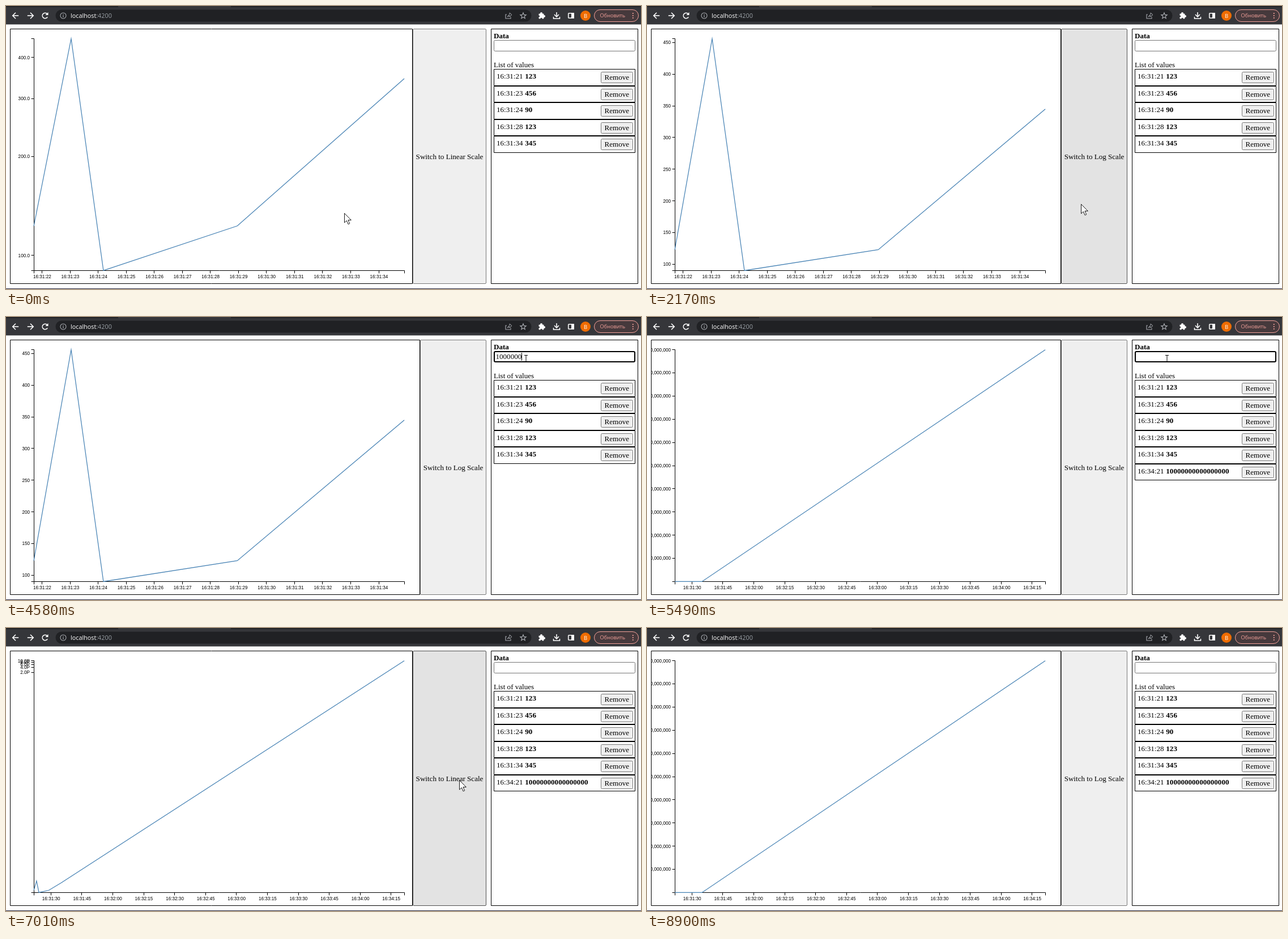
Recreate the animation shown at these times as an HTML page with a canvas. Size 1121 by 499 pixels, loop 9150 ms.

```html
<!DOCTYPE html>
<html lang="en">
<head>
<meta charset="utf-8">
<title>Chart demo</title>
<style>
html, body { margin: 0; width: 100%; height: 100%; overflow: hidden; background: #fff; }
canvas { display: block; }
</style>
</head>
<body>
<canvas id="stage" width="1121" height="499"></canvas>
<script>
const g = document.getElementById('stage').getContext('2d');
const LOOP = 9150, TICKS = 72;      // the screen refreshes 72 times per loop
const S = .8175;                    // page zoom
const BODY = `${16 * S}px "Liberation Serif", "Times New Roman", serif`;
const BOLD = `bold ${BODY}`;
const AXIS = `${10 * S}px "Liberation Sans", Arial, sans-serif`;
const ui = size => `${size}px "Open Sans", "Noto Sans", sans-serif`;

// Plot area
const L = 49.1, R = L + 800 * S, T = 57.7, B = T + 500 * S;

// Seconds after 16:31:00 and value
const DATA = [[21.71, 123], [23.04, 456], [24.19, 90], [28.96, 123], [34.91, 345], [201.4, 1e16]];

// Moments, counted in refreshes
const CLICKS = [6, 11, 17, 55, 66];
const FOCUS = 24, TYPE = 31, REPEAT = 36, TYPED = 38, ENTER = 43, BLUR = 54;

// Mouse moves: first and last refresh, destination
const HOME = [597, 365];
const MOVES = [
  [1, 5, 766, 349],
  [17, 19, 874, 228],
  [19, 23, 918, 73],
  [51, 53, 800, 268],
  [67, 70, 1095, 505]
];

const clamp = (v, lo, hi) => Math.min(hi, Math.max(lo, v));
const ease = u => u * u * (3 - 2 * u);
const snap = v => Math.floor(v) + .5;
const range = (a, b, step = 1) => Array.from({ length: Math.floor((b - a) / step) + 1 }, (_, i) => a + i * step);

function mouse(n) {
  let [x, y] = HOME;
  for (const [from, to, tx, ty] of MOVES) {
    const u = ease(clamp((n - from) / (to - from), 0, 1));
    x += (tx - x) * u;
    y += (ty - y) * u;
  }
  return [Math.round(x), Math.round(y)];
}

function typed(n) {
  if (n < TYPE || n >= ENTER) return '';
  const len = n < REPEAT ? Math.min(2, n - TYPE + 1) : Math.min(17, 7 + 5 * (n - REPEAT));
  return '1'.padEnd(len, '0');
}

// The caret blinks every four refreshes and restarts with each key
function caretOn(n) {
  const key = n < TYPE ? FOCUS : Math.min(n, TYPED);
  return Math.floor((n - key) / 4) % 2 === 0;
}

function text(s, x, y, font, color = '#000', align = 'left') {
  g.font = font;
  g.fillStyle = color;
  g.textAlign = align;
  g.fillText(s, x, y);
}

function rect(x, y, w, h, color) {
  g.fillStyle = color;
  g.fillRect(x, y, w, h);
}

function paint(fill, stroke, lw = 1) {
  if (fill) { g.fillStyle = fill; g.fill(); }
  if (stroke) { g.lineWidth = lw; g.strokeStyle = stroke; g.stroke(); }
}

function box(x, y, w, h, r, fill, stroke, lw = 1) {
  g.beginPath();
  g.roundRect(x + lw / 2, y + lw / 2, w - lw, h - lw, r);
  paint(fill, stroke, lw);
}

function poly(pts, fill, stroke, lw, close) {
  g.beginPath();
  pts.forEach(p => g.lineTo(...p));
  if (close) g.closePath();
  paint(fill, stroke, lw);
}

const line = (color, lw, ...pts) => poly(pts, null, color, lw);

function arc(x, y, r, fill, stroke, lw, from = 0, to = 2 * Math.PI) {
  g.beginPath();
  g.arc(x, y, r, from, to);
  paint(fill, stroke, lw);
}

// Arrow with its tip at the right of the centre, turned by angle
function arrow(x, y, r, angle) {
  g.save();
  g.translate(x, y);
  g.rotate(angle);
  line('#fff', 1.6, [-r, 0], [r, 0]);
  line('#fff', 1.6, [0, -r], [r, 0], [0, r]);
  g.restore();
}

function toolbar() {
  const white = '#fff', grey = '#a9acb1', pink = '#f4a19a', bar = '#35363a', dark = '#202124';
  rect(0, 0, 1121, 32.5, bar);
  rect(0, 0, 198, 2, dark);
  rect(397, 0, 724, 2, dark);
  box(87, 6, 841, 22, 11, dark);

  arrow(17, 17, 5.2, Math.PI);
  arrow(43, 17, 5.2, 0);
  arc(69, 17, 4.8, null, white, 1.6, .5, 5.5);
  poly([[74.5, 11], [74.5, 16], [69.5, 16]], white);

  arc(101, 17, 5, null, grey, 1.1);
  rect(100.4, 16.2, 1.2, 3.6, grey);
  rect(100.4, 14, 1.2, 1.2, grey);
  text('localhost', 114, 21, ui(10.8), white);
  text(':4200', 114 + g.measureText('localhost').width, 21, ui(10.8), '#9aa0a6');

  // Share and star
  line(grey, 1.1, [884, 15], [882, 15], [882, 22], [891, 22], [891, 19.5]);
  poly([[885, 19], [889, 14.5], [889, 12], [893, 15.5], [889, 19], [889, 17]], null, grey, 1, true);
  const star = range(0, 9).map(i => {
    const a = i * Math.PI / 5, r = i % 2 ? 2.4 : 5.5;
    return [913 + r * Math.sin(a), 17.3 - r * Math.cos(a)];
  });
  poly(star, null, grey, 1.1, true);

  // Puzzle, download, side panel
  box(940, 13, 10, 10, 1, white);
  arc(945, 13, 2, white);
  arc(950, 18, 2, white);
  arc(940.7, 18, 1.6, bar);
  arc(945, 22.4, 1.6, bar);
  arrow(972, 15, 4, Math.PI / 2);
  line(white, 1.5, [966.5, 19], [966.5, 22.3], [977.5, 22.3], [977.5, 19]);
  box(992, 12, 11, 10, 1, null, white, 1.5);
  rect(998, 12, 5, 10, white);

  arc(1023, 17, 9, '#ef6c00');
  text('B', 1023, 20.5, ui(9.5), white, 'center');
  box(1038, 6, 79, 22, 10.5, '#46393c', pink);
  text('Обновить', 1048.5, 20.3, ui(9.2), pink);
  range(13, 21, 4).forEach(y => arc(1106.8, y, 1.1, pink));
}

const pad = n => String(n).padStart(2, '0');
const clock = s => `16:${pad(31 + Math.floor(s / 60))}:${pad(Math.floor(s % 60))}`;

function yTicks(linear, big) {
  if (linear && big) return range(1e15, 1e16, 1e15).map(v => [v, v.toLocaleString('en-US')]);
  if (linear) return range(100, 450, 50).map(v => [v, String(v)]);
  if (big) return range(2, 10, 2).map(v => [v * 1e15, v.toFixed(1) + 'P']);
  return range(100, 400, 100).map(v => [v, v.toFixed(1)]);
}

function chart(linear, big, right) {
  const pts = big ? DATA : DATA.slice(0, -1);
  const t0 = pts[0][0], t1 = pts.at(-1)[0], lo = 90, hi = big ? 1e16 : 456;
  const f = linear ? v => v : Math.log;
  const x = s => L + (R - L) * (s - t0) / (t1 - t0);
  const y = v => B - (B - T) * (f(v) - f(lo)) / (f(hi) - f(lo));
  const l = snap(L), r = snap(R), t = snap(T), b = snap(B), tick = 6 * S;

  g.save();
  g.beginPath();
  g.rect(8, 41, right - 9, 448);
  g.clip();
  line('#000', 1, [l - tick, t], [l, t], [l, b], [l - tick, b]);
  line('#000', 1, [l, b + tick], [l, b], [r, b], [r, b + tick]);
  for (const [v, label] of yTicks(linear, big)) {
    const py = snap(y(v));
    line('#000', 1, [l - tick, py], [l, py]);
    text(label, 42, y(v) + 2.9, AXIS, '#000', 'right');
  }
  for (const s of big ? range(30, 195, 15) : range(22, 34)) {
    const px = snap(x(s));
    line('#000', 1, [px, b], [px, b + tick]);
    text(clock(s), x(s) + .4, 479.7, AXIS, '#000', 'center');
  }
  line('#4682b4', 1.5 * S, ...pts.map(([s, v]) => [x(s), y(v)]));
  g.restore();
  box(7, 40, right - 7, 450, 0, null, '#000');
}

function panel(n) {
  box(856, 40, 260, 450, 0, null, '#000');
  text('Data', 861, 57, BOLD);
  const focus = n >= FOCUS && n < BLUR, entry = typed(n);
  box(861, 60, 250, 20, 2, '#fff', focus ? '#000' : '#767676', focus ? 2 : 1);
  text(entry, 864.5, 74.3, BODY);
  if (focus && caretOn(n)) rect(Math.floor(864.5 + entry.length * 8 * S), 63, 1, 14, '#000');

  text('List of values', 861, 108, BODY);
  const top = i => Math.round(111 + i * 29.5);
  DATA.slice(0, n < ENTER ? -1 : undefined).forEach(([s, v], i) => {
    const y = top(i);
    box(861, y, 250, top(i + 1) - y, 0, null, '#000');
    text(clock(s), 866, y + 16.7, BODY);
    text(String(v), 916.3, y + 16.7, BOLD);
    box(1050, y + 5, 57, 20, 2, '#efefef', '#767676');
    text('Remove', 1078.3, y + 19.3, BODY, '#000', 'center');
  });
}

function pointer(x, y) {
  if (x > 861 && y > 60 && y < 80) {
    line('#000', 1, [x, y - 5], [x, y + 5]);
    for (const end of [y - 5.5, y + 5.5]) line('#000', 1, [x - 3, end], [x + 3, end]);
    return;
  }
  const shape = [[0, 0], [0, 16.5], [3.8, 13], [6.6, 19.3], [9.2, 18.2], [6.5, 12], [11.8, 12]];
  poly(shape.map(([a, b]) => [x + .5 + a, y + .5 + b]), '#fff', '#000', .9, true);
}

function draw(n) {
  const [px, py] = mouse(n);
  const linear = CLICKS.filter(c => c <= n).length % 2 === 1;
  const pressed = n >= ENTER && CLICKS.includes(n + 1);
  const left = linear ? 731 : 718;
  const hover = px >= left && px < 848;
  const [fill, edge] = pressed ? ['#f5f5f5', '#8d8d8d'] : hover ? ['#e3e3e3', '#4f4f4f'] : ['#efefef', '#767676'];

  rect(0, 0, 1121, 499, '#fff');
  toolbar();
  rect(0, 498, 1121, 1, '#22223a');
  chart(linear, n >= ENTER, left);
  box(left, 40, 848 - left, 450, 1.5, fill, edge);
  text(`Switch to ${linear ? 'Log' : 'Linear'} Scale`, (left + 848) / 2, 269.5, BODY, '#000', 'center');
  panel(n);
  pointer(px, py);
}

const start = performance.now();
function run() {
  const t = (performance.now() - start) % LOOP;
  draw(Math.min(TICKS - 1, Math.floor((t + 8) / LOOP * TICKS)));
  requestAnimationFrame(run);
}
run();
</script>
</body>
</html>
```
